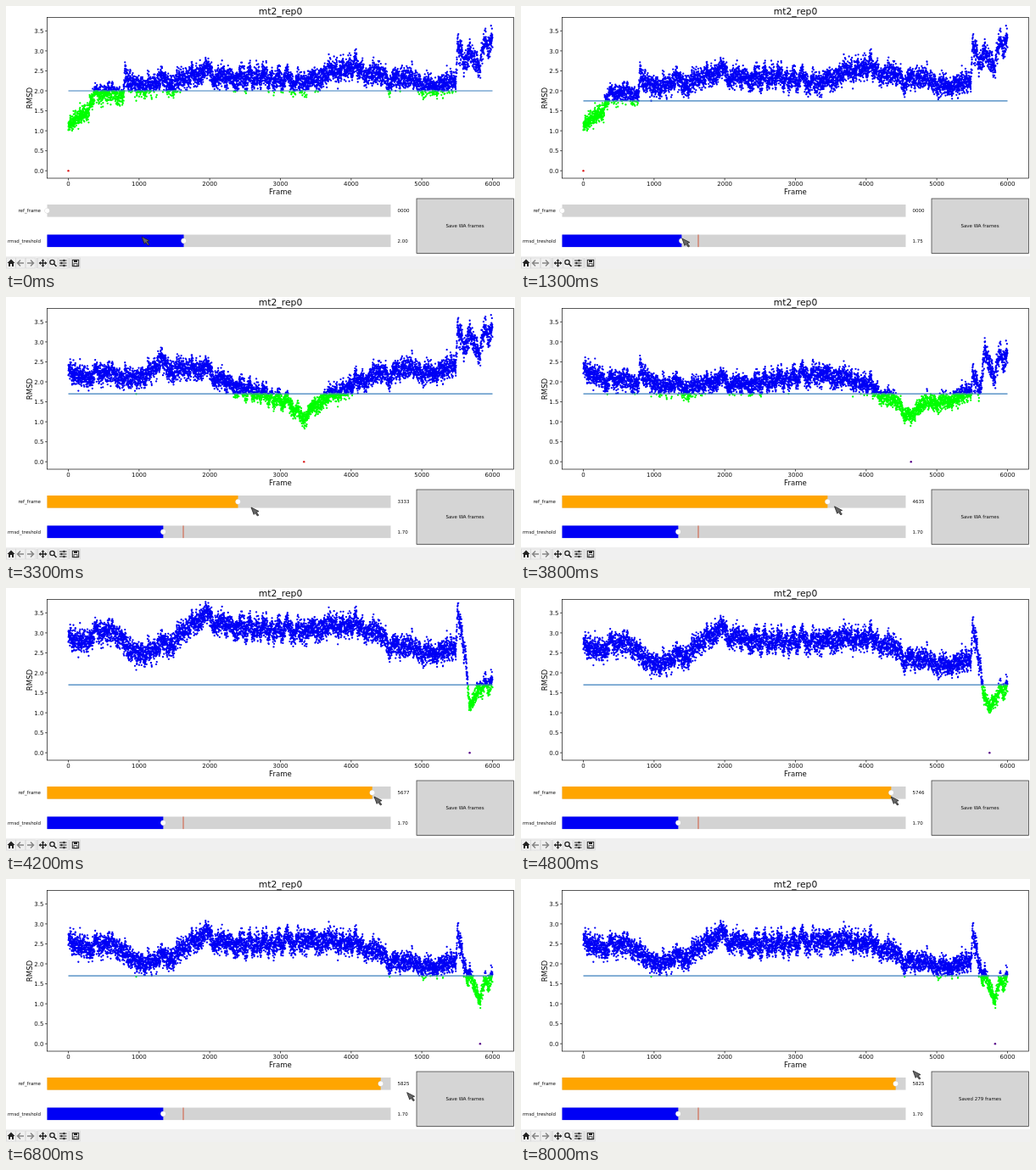
These frames come from a looping animation (600 px wide and 310 px high, 8400 ms). An HTML page with a canvas:

```html
<!DOCTYPE html>
<html lang="en">
<head>
<meta charset="utf-8">
<title>RMSD explorer</title>
<style>
html, body { margin: 0; width: 100%; height: 100%; overflow: hidden; background: #fff; }
canvas { display: block; }
</style>
</head>
<body>
<canvas id="stage" width="600" height="310"></canvas>
<script>
const ctx = document.getElementById('stage').getContext('2d');
const LOOP = 8400, STEP = 100, LAST = 8000, COUNT = 6000, INK = '#111';
const plot = { left: 48.5, top: 13.5, width: 550, height: 189.5 };
const track = { left: 48.5, width: 405, height: 14.6 };
const plotX = frame => 73.5 + frame / 12;
const plotY = rmsd => 194.2 - rmsd * 47.1;

// Control keys: time in ms, then values.
const references = [[2300, 0], [2500, 290], [3300, 3333], [4200, 5677], [5600, 5839], [6200, 5825]];
const thresholds = [[500, 2], [1300, 1.75], [1500, 1.7]];
const pointer = [[0, 160, 272], [400, 209, 274], [500, 209, 274], [1500, 185, 274], [2200, 52, 246], [2500, 100, 248],
  [3300, 289, 248], [4200, 434, 246], [6700, 443, 246], [7000, 532, 263], [7600, 532, 263], [LAST, 462, 226]];

// Waypoints of the molecule: frame, then its place in a three-dimensional conformation space.
const waypoints = [
  [0, 0, 0, 0], [295, 0.3, 0, 0], [300, 0.9, 0, 0], [770, 0.9, 0, 0], [800, 1.1, 0.65, 0.8],
  [1300, 1.15, -0.45, 0.5], [1900, 1.5, -0.1, -0.35], [2700, 1.4, 0.7, 0], [3333, 0.85, 1.06, 0],
  [3950, 1.7, 0.7, 0], [4300, 1.55, -0.1, -0.1], [4700, 1.3, -0.4, 0.3], [5480, 1, -0.45, 0.15],
  [5510, 2.1, -1.5, -0.4], [5620, 1.6, -0.9, 0.6], [5677, 0.45, -0.3, 2.15],
  [5825, 1.1, -0.3, 1.4], [5839, 1.1, -0.4, 2], [6000, 1.4, -0.45, 2.3]];

// Linear interpolation between keys, held at both ends.
function at(keys, position) {
  const i = keys.findIndex(key => key[0] > position);
  if (i <= 0) return keys.at(i).slice(1);
  const a = keys[i - 1], b = keys[i], u = (position - a[0]) / (b[0] - a[0]);
  return a.slice(1).map((value, j) => value + (b[j + 1] - value) * u);
}

let seed = 7, drift = 0;
function random() {
  seed = (seed * 1664525 + 1013904223) >>> 0;
  return seed / 4294967296;
}
const gauss = () => (random() + random() + random() + random() - 2) * 1.73;

const places = [], noise = [];
for (let i = 0; i <= COUNT; i++) {
  drift = drift * 0.97 + gauss() * 0.022;
  noise.push(drift + gauss() * 0.115);
  places.push(at(waypoints, i));
}

// Distance in conformation space plus thermal spread that grows with the lag.
function rmsd(i, reference) {
  const lag = Math.abs(i - reference);
  const spread = 1.2 + (1 - Math.exp(-lag / 150)) + 1.3 * (1 - Math.exp(-lag / 1500));
  const distance = places[i].reduce((sum, c, k) => sum + (c - places[reference][k]) ** 2, 0);
  const mean = Math.sqrt(spread + distance);
  return mean + noise[i] * Math.min(1.15, 0.4 + mean * 0.3);
}

function text(string, x, y, size, align = 'center') {
  ctx.font = `${size}px "DejaVu Sans", sans-serif`;
  ctx.textAlign = align;
  ctx.fillStyle = INK;
  ctx.fillText(string, x, y);
}

function rect(x, y, w, h, color) {
  ctx.fillStyle = color;
  ctx.fillRect(x, y, w, h);
}

function frameRect(x, y, w, h, color, width) {
  ctx.strokeStyle = color;
  ctx.lineWidth = width;
  ctx.strokeRect(x, y, w, h);
}

function stroke(color, width, ...lines) {
  ctx.strokeStyle = color;
  ctx.lineWidth = width;
  ctx.beginPath();
  for (const line of lines) line.forEach(([x, y], i) => i ? ctx.lineTo(x, y) : ctx.moveTo(x, y));
  ctx.stroke();
}

function fillShape(points, color) {
  ctx.beginPath();
  points.forEach(([x, y]) => ctx.lineTo(x, y));
  ctx.closePath();
  ctx.fillStyle = color;
  ctx.fill();
}

function disc(x, y, r, color) {
  ctx.beginPath();
  ctx.arc(x, y, r, 0, 7);
  ctx.fillStyle = color;
  ctx.fill();
}

function drawPoints(reference, threshold) {
  const above = new Path2D(), below = new Path2D();
  for (let i = 0; i <= COUNT; i++) {
    const value = rmsd(i, reference), x = plotX(i), y = plotY(value);
    const path = value < threshold ? below : above;
    path.moveTo(x + 1.15, y);
    path.arc(x, y, 1.15, 0, 7);
  }
  ctx.save();
  ctx.beginPath();
  ctx.rect(plot.left, plot.top, plot.width, plot.height);
  ctx.clip();
  ctx.fillStyle = '#0000f5';
  ctx.fill(above);
  ctx.fillStyle = '#00ff00';
  ctx.fill(below);
  disc(plotX(reference), plotY(0), 1.2, reference > 4500 ? '#508' : '#d22');
  ctx.restore();
}

function drawAxes() {
  frameRect(plot.left, plot.top, plot.width, plot.height, INK, 0.7);
  for (let f = 0; f <= COUNT; f += 1000) {
    stroke(INK, 0.7, [[plotX(f), 203], [plotX(f), 205.5]]);
    text(f, plotX(f), 212.3, 7);
  }
  for (let v = 0; v < 4; v += 0.5) {
    stroke(INK, 0.7, [[46, plotY(v)], [48.5, plotY(v)]]);
    text(v.toFixed(1), 44.5, plotY(v) + 2.6, 7, 'right');
  }
  text('mt2_rep0', 323.5, 9.5, 10.8);
  text('Frame', 323.5, 222, 8.6);
  ctx.save();
  ctx.translate(31, 108.5);
  ctx.rotate(-Math.PI / 2);
  text('RMSD', 0, 0, 8.6);
  ctx.restore();
}

function drawSlider(label, y, length, color, value, initial) {
  rect(track.left, y, track.width, track.height, '#d3d3d3');
  rect(track.left, y, length, track.height, color);
  if (initial > length) rect(track.left + initial - 1, y, 1, track.height, '#d2583c');
  disc(track.left + length, y + 7.3, 3.1, '#d3d3d3');
  disc(track.left + length, y + 7.3, 2.7, '#fff');
  text(label, 41, y + 9, 5.5, 'right');
  text(value, 461.5, y + 9, 5.5, 'left');
}

function drawButton(label, hover) {
  rect(484, 227, 115, 65, hover ? '#f2f2f2' : '#d5d5d5');
  frameRect(484, 227, 114.5, 64.5, '#333', 0.7);
  text(label, 541, 261, 5.5);
}

function drawToolbar() {
  const ink = '#222', paper = '#f0f0f0', y = 303;
  rect(0, 295, 600, 15, paper);
  for (const x of [6, 17, 29, 43.5, 55.5, 67.5, 82]) frameRect(x - 5.5, 297, 11, 12, '#d4d4d4', 0.6);
  fillShape([[1.5, y], [6, y - 4.5], [10.5, y], [9, y], [9, y + 4], [7, y + 4], [7, y + 1], [5, y + 1], [5, y + 4], [3, y + 4], [3, y]], ink);
  for (const [x, d] of [[17, 1], [29, -1]])
    stroke('#858585', 1.5, [[x, y - 3.5], [x - 3.5 * d, y], [x, y + 3.5]], [[x - 3 * d, y], [x + 4 * d, y]]);
  stroke('#c4c4c4', 0.7, [[36.5, 297], [36.5, 309]], [[74.5, 297], [74.5, 309]]);

  stroke(ink, 1.3, [[39.5, y], [47.5, y]], [[43.5, y - 4], [43.5, y + 4]]);
  for (const [dx, dy] of [[1, 0], [-1, 0], [0, 1], [0, -1]]) {
    const bx = 43.5 + dx * 2.5, by = y + dy * 2.5;
    fillShape([[43.5 + dx * 4.8, y + dy * 4.8], [bx + dy * 2, by + dx * 2], [bx - dy * 2, by - dx * 2]], ink);
  }
  disc(54.5, y - 1, 3.3, ink);
  disc(54.5, y - 1, 2, paper);
  stroke(ink, 1.6, [[56.5, y + 1], [59.5, y + 4]]);
  for (const row of [-1, 0, 1]) {
    stroke(ink, 1, [[63, y + row * 3], [71.5, y + row * 3]]);
    rect(row ? 67.5 : 64.5, y + row * 3 - 1.2, 1.8, 2.4, ink);
  }
  frameRect(78.3, y - 3.7, 7.4, 7.4, ink, 1);
  rect(80, y - 3.5, 4, 2.5, ink);
  frameRect(80, y + 0.7, 4, 3, ink, 0.8);
}

function drawPointer(x, y) {
  const outline = [[0, 0], [9, 4.6], [6.2, 5.6], [8.8, 9.2], [7.4, 10], [4.6, 6.6], [3.2, 8.4]];
  ctx.save();
  ctx.translate(x, y);
  fillShape(outline, '#666');
  stroke('#222', 0.8, [...outline, outline[0]]);
  ctx.restore();
}

function draw(t) {
  const [threshold] = at(thresholds, t), [x, y] = at(pointer, t);
  const reference = Math.round(at(references, t)[0]);
  rect(0, 0, 600, 310, '#fff');
  drawPoints(reference, threshold);
  stroke('#3a7fbd', 1.2, [[73.5, plotY(threshold)], [573.5, plotY(threshold)]]);
  drawAxes();
  drawSlider('ref_frame', 234, reference * track.width / COUNT, '#ffa500', String(reference).padStart(4, '0'), 0);
  drawSlider('rmsd_treshold', 269.5, threshold * 80.5, '#0000f5', threshold.toFixed(2), 161);
  drawButton(t < 7000 ? 'Save WA frames' : 'Saved 279 frames', x > 484 && y > 227);
  drawToolbar();
  drawPointer(x, y);
}

let shown = -1;
function tick(now) {
  const t = Math.min(LAST, Math.floor(now % LOOP / STEP) * STEP);
  if (t !== shown) draw(shown = t);
  requestAnimationFrame(tick);
}
draw(0);
requestAnimationFrame(tick);
</script>
</body>
</html>
```
